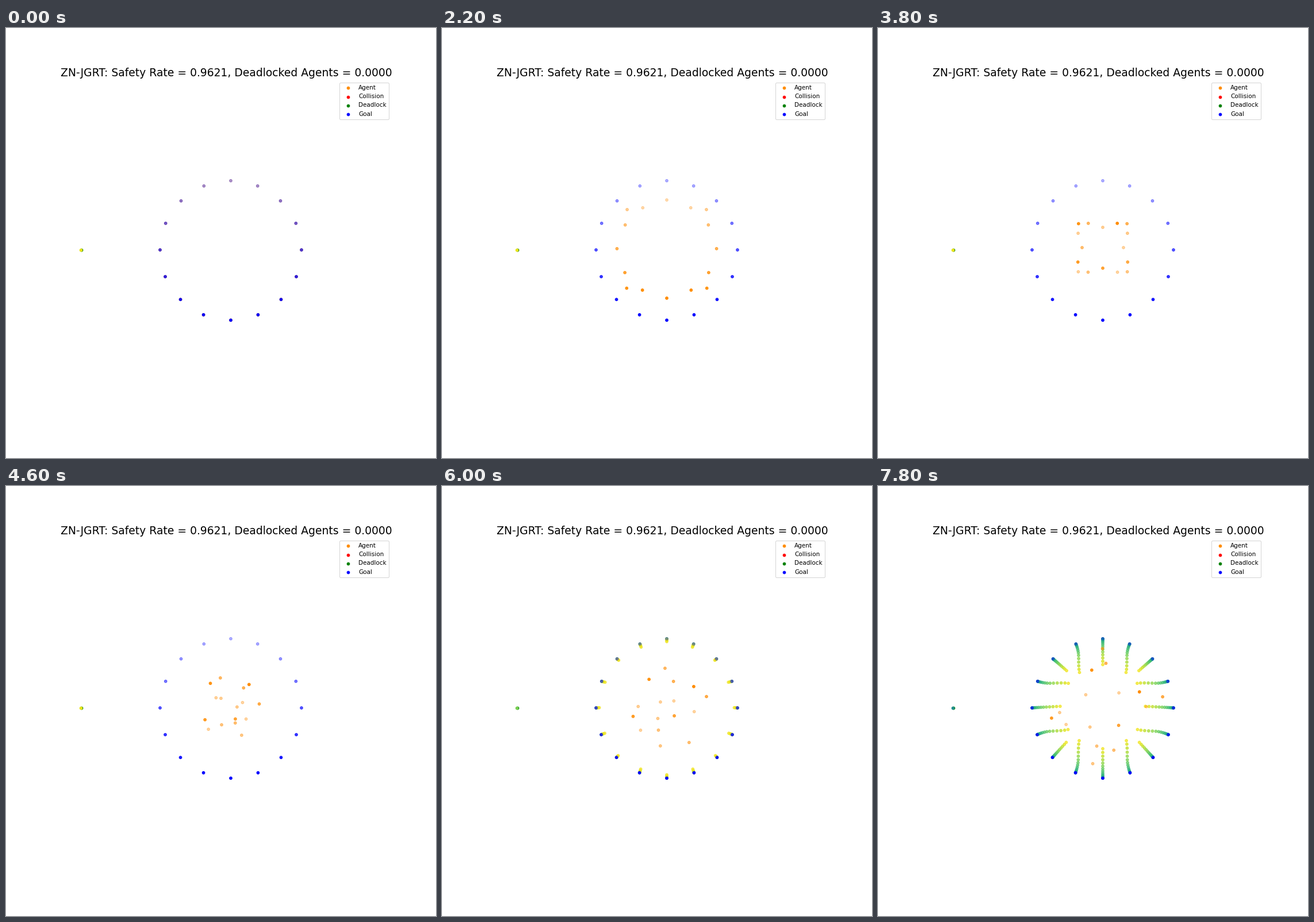
These frames come from a looping animation (748x748 px, 8 s). A matplotlib script:

```python
import numpy as np
import matplotlib.pyplot as plt
from matplotlib.animation import FuncAnimation
from matplotlib.colors import to_rgba

SIZE = 748
STEPS = 40
STEP_MS = 200
COUNT = 16
LAG = 26               # the trail replays each path this many steps late
CRASHED = 13
CRASH_STEPS = (25, 26, 27)
CENTER = 391, 386

# Closing in: step, radius on axes / between / on diagonals, swerve, rise
CLOSING = [(0, 123, 123, 123, 0, 0),
           (7, 107.5, 106, 112, 1.3, 1),
           (14, 68, 68, 85, 12.8, 3),
           (19, 36, 50, 60, 8, 4)]
# Leaving again in four lanes per quarter: step, lane radii, lane turns
LEAVING = [(26, (58, 32, 56, 20), (12, -15, 35, 45)),
           (34, (76, 62, 65, 22), (-3, -10, 25, 40)),
           (39, (97, 73, 70, 40), (0, -1, 15, 45))]
# Agents of each lane, by quarter
LANES = [15, 5, 9, 14, 13, 2, 4, 11, 3, 6, 10, 8, 0, 7, 1, 12]

index = np.arange(COUNT)
bearing = index * 360 / COUNT
rng = np.random.default_rng(4)
wobble = rng.uniform(-12, 12, COUNT)
stretch = rng.uniform(0.9, 1.1, COUNT)


def place(radius, degrees, rise=0):
    """Stage position on the tilted plane, slightly larger when near."""
    a = np.radians(degrees)
    near = 1 + 0.008 * np.sin(a)
    return np.column_stack([
        CENTER[0] + radius * np.cos(a) / near,
        CENTER[1] - 0.986 * radius * np.sin(a) / near - rise])


def closing(axis, between, diagonal, swerve, rise):
    radius = np.array([axis, between, diagonal, between])[index % 4]
    # agents between the axes drift towards the nearest diagonal
    lean = np.array([0, 1, 0, -1])[index % 4]
    return place(radius, bearing + swerve * lean, rise)


def leaving(radii, turns):
    pose = np.empty((COUNT, 2))
    quarter = np.tile([0, 90, 180, 270], 4)
    pose[LANES] = place(np.repeat(radii, 4) * stretch,
                        quarter + np.repeat(turns, 4) + wobble)
    return pose


key_steps = np.array([row[0] for row in CLOSING + LEAVING])
keys = np.array([closing(*row[1:]) for row in CLOSING]
                + [leaving(*row[1:]) for row in LEAVING])
slopes = np.gradient(keys, key_steps, axis=0)
slopes[0] = 0


def agents_at(step):
    """Cubic Hermite curve through the key poses."""
    a = min(np.searchsorted(key_steps, step, side="right") - 1,
            len(key_steps) - 2)
    h = key_steps[a + 1] - key_steps[a]
    u = (step - key_steps[a]) / h
    return ((2 * u**3 - 3 * u**2 + 1) * keys[a]
            + (u**3 - 2 * u**2 + u) * h * slopes[a]
            + (3 * u**2 - 2 * u**3) * keys[a + 1]
            + (u**3 - u**2) * h * slopes[a + 1])


paths = np.array([agents_at(s) for s in range(STEPS)])
goals = place(123, bearing)

# Farther dots are fainter; the depth order is shuffled in the middle
ring_alpha = 0.65 - 0.35 * np.sin(np.radians(bearing))
mixed_alpha = 0.35 + 0.65 * (5 * index % COUNT / (COUNT - 1)) ** 2


def alphas_at(step):
    mix = np.clip((step - 14) / 5, 0, 1)
    return (1 - mix) * ring_alpha + mix * mixed_alpha


def tint(color, alphas):
    rgba = np.tile(to_rgba(color), (len(alphas), 1))
    rgba[:, 3] = alphas
    return rgba


def paint(dots, points, colors):
    dots.set_offsets(np.reshape(points, (-1, 2)))
    dots.set_facecolor(colors)
    dots.set_edgecolor(colors)


fig = plt.figure(figsize=(10, 10), dpi=SIZE / 10, facecolor="white")
ax = fig.add_subplot()
side = 0.77 * SIZE
middle = 0.5125 * SIZE
ax.set_xlim(middle - side / 2, middle + side / 2)
ax.set_ylim(0.89 * SIZE, 0.12 * SIZE)
ax.set_aspect("equal")
ax.axis("off")
ax.set_title("ZN-JGRT: Safety Rate = 0.9621, Deadlocked Agents = 0.0000",
             fontsize=18)


def layer(color, z, label=None):
    return ax.scatter([], [], s=20, color=color, zorder=z, label=label)


agents = layer("darkorange", 4, "Agent")
crashes = layer("red", 5, "Collision")
idle = layer("green", 1, "Deadlock")
targets = layer("blue", 6, "Goal")
trail = layer("yellow", 3)
parked = layer("yellow", 2)
ax.legend(loc="upper right")

paint(idle, (131, 386), "green")
paint(targets, goals, tint("blue", ring_alpha))


def update(step):
    alphas = alphas_at(step)
    order = np.argsort(alphas)
    paint(agents, paths[step, order], tint("darkorange", alphas[order]))
    paint(crashes, paths[step, CRASHED] if step in CRASH_STEPS else [], "red")

    count = max(0, step - LAG + 1)
    oldest = 0.97 - 0.034 * count
    paint(parked, (130.2, 386), plt.cm.viridis(oldest))
    shades = plt.cm.viridis(np.linspace(oldest, 0.98, count))
    shades[:, 3] = 0.75
    paint(trail, paths[:count], np.repeat(shades, COUNT, axis=0))
    return agents, crashes, trail, parked


anim = FuncAnimation(fig, update, frames=STEPS, interval=STEP_MS,
                     init_func=lambda: update(0), repeat=True,
                     repeat_delay=0)
plt.show()
```
